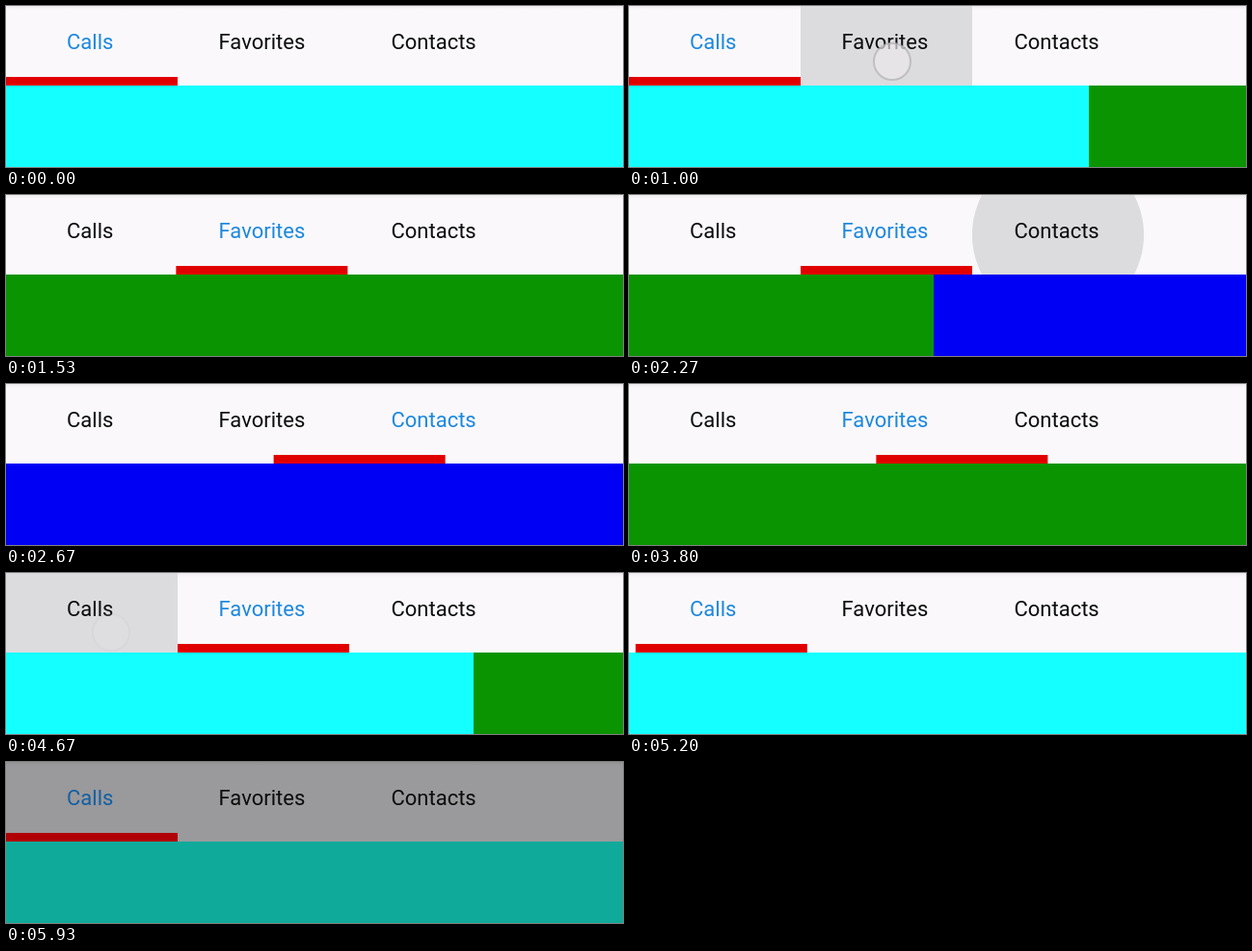
Recreate the animation shown at these times as an HTML page with a canvas. Size 640 px wide and 168 px high, loop 6390 ms.

```html
<!DOCTYPE html>
<html lang="en">
<head>
<meta charset="utf-8">
<title>Tabs</title>
<style>
  html, body { margin: 0; height: 100%; overflow: hidden; }
  canvas { display: block; }
</style>
</head>
<body>
<canvas id="stage" width="640" height="168"></canvas>
<script>
const ctx = document.getElementById('stage').getContext('2d');
const LOOP = 6390, WIDTH = 640, HEIGHT = 168, BAR = 83, TAB = 178;
const labels = ['Calls', 'Favorites', 'Contacts'];
const pages = [[20, 255, 255], [10, 148, 2], [0, 0, 244]];

// Times in ms: finger down, finger up, page slide start, tab selection.
const taps = [
  { from: 0, to: 1, x: 273, y: 58, press: 670, lift: 990, slide: 973, select: 1235 },
  { from: 1, to: 2, x: 440, y: 56, press: 2070, lift: 2130, slide: 2208, select: 2545 },
  { from: 2, to: 1, x: 293, y: 54, press: 3200, lift: 3330, slide: 3315, select: 3675 },
  { from: 1, to: 0, x: 109, y: 62, press: 4330, lift: 4560, slide: 4558, select: 4940 }
];

const progress = (t, start, length) => Math.min(1, Math.max(0, (t - start) / length));
const easeOut = (p, power) => 1 - (1 - p) ** power;
const easeBoth = p => easeOut(p ** 1.4, 3);
const mix = (a, b, p) => `rgb(${a.map((v, i) => Math.round(v + (b[i] - v) * p))})`;

function rect(color, x, y, w, h) {
  ctx.fillStyle = color;
  ctx.fillRect(x, y, w, h);
}

function circle(x, y, r) {
  ctx.beginPath();
  ctx.arc(x, y, r, 0, Math.PI * 2);
}

function drawRipple(tap, t) {
  const age = t - tap.press;
  if (age < 0 || age > 590) return;
  ctx.save();
  ctx.beginPath();
  ctx.rect(tap.to * TAB, 0, TAB, BAR);
  ctx.clip();
  ctx.globalAlpha = 1 - progress(age, 380, 210);
  ctx.fillStyle = '#dcdbde';
  circle((tap.to + 0.5) * TAB, 41.5, 100 * easeOut(progress(age, 0, 300), 2));
  ctx.fill();
  ctx.restore();
}

function drawFinger(tap, t) {
  if (t < tap.press) return;
  ctx.save();
  ctx.globalAlpha = 1 - progress(t, tap.lift, 130);
  circle(tap.x, tap.y, 19);
  ctx.fillStyle = 'rgba(235,234,237,.72)';
  ctx.fill();
  ctx.lineWidth = 2;
  ctx.strokeStyle = 'rgba(180,179,183,.8)';
  ctx.stroke();
  ctx.restore();
}

function draw(t) {
  let scroll = 0, marker = 0, active = 0;
  for (const tap of taps) {
    const step = tap.to - tap.from;
    scroll += step * easeOut(progress(t, tap.slide, 300), 3);
    marker += step * easeBoth(progress(t, tap.select, 350));
    if (t >= tap.select) active = tap.to;
  }
  const fade = progress(t, 5735, 195);

  rect(mix([250, 248, 251], [154, 153, 155], fade), 0, 0, WIDTH, BAR);
  const edge = ctx.createLinearGradient(0, 0, 0, 4);
  edge.addColorStop(0, 'rgba(0,0,0,.05)');
  edge.addColorStop(1, 'rgba(0,0,0,0)');
  rect(edge, 0, 0, WIDTH, 4);
  taps.forEach(tap => drawRipple(tap, t));

  pages.forEach((color, i) => {
    const x = Math.round((i - scroll) * WIDTH);
    rect(mix(color, [16, 170, 155], fade), x, BAR, WIDTH, HEIGHT - BAR);
  });
  rect(mix([225, 0, 0], [176, 0, 6], fade), marker * TAB, 74, TAB, 9);

  ctx.font = '22px Roboto, sans-serif';
  ctx.textAlign = 'center';
  labels.forEach((label, i) => {
    ctx.fillStyle = i === active ? mix([28, 136, 222], [18, 96, 164], fade) : '#0c0c0d';
    ctx.fillText(label, 87.2 + i * 178.2, 45);
  });
  taps.forEach(tap => drawFinger(tap, t));
}

const start = performance.now();
function tick() {
  draw((performance.now() - start) % LOOP);
  requestAnimationFrame(tick);
}
tick();
</script>
</body>
</html>
```
